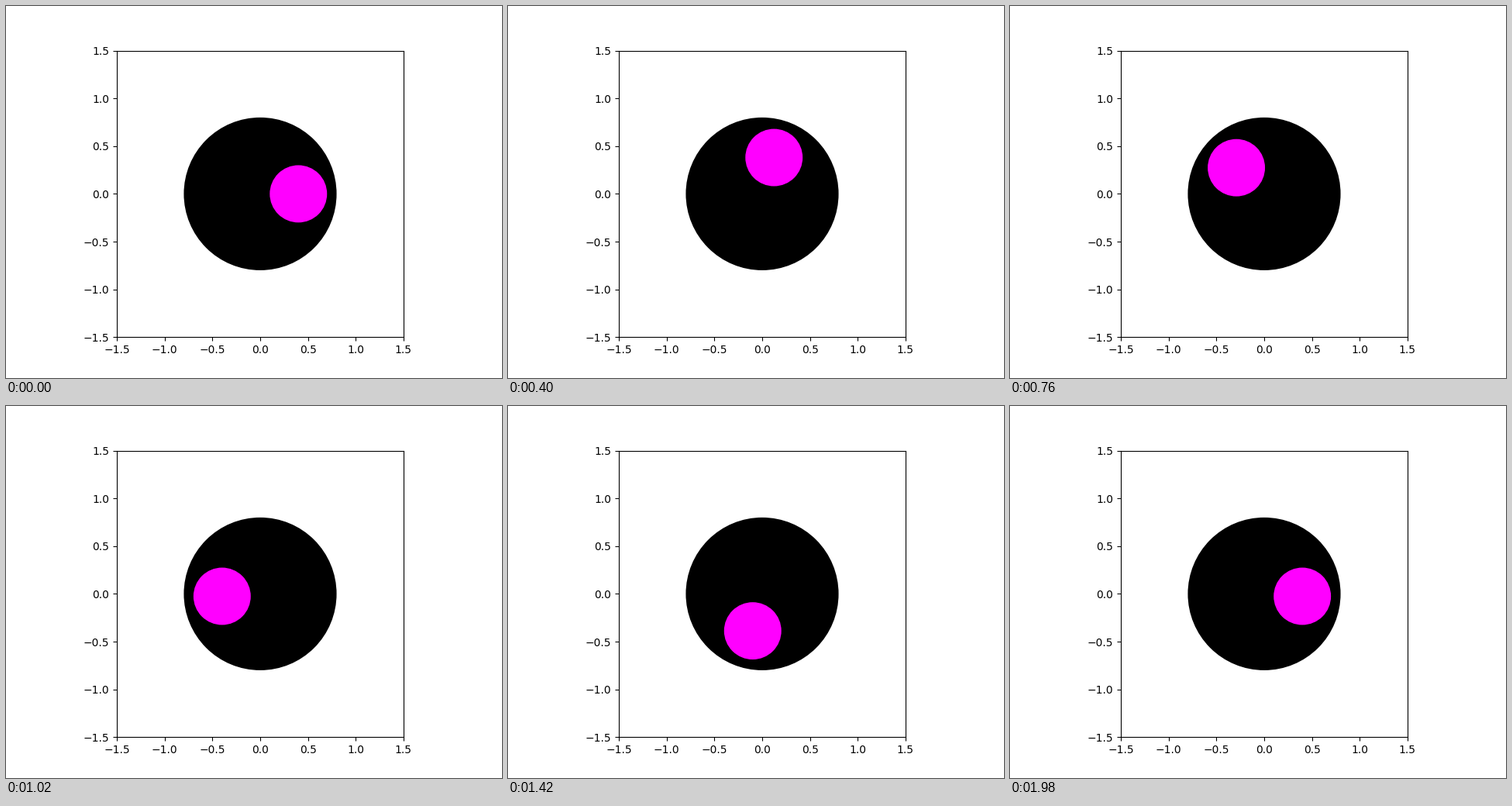
These frames come from a looping animation (640x480 px, 2 s). A matplotlib script:

```python
import numpy as np
import matplotlib.pyplot as plt
from matplotlib.animation import FuncAnimation

FRAMES = 100
INTERVAL = 20  # ms
ORBIT = 0.4

fig, ax = plt.subplots(figsize=(6.4, 4.8), dpi=100)
ax.set(xlim=(-1.5, 1.5), ylim=(-1.5, 1.5), aspect="equal")

disc = plt.Circle((0, 0), 0.8, fc="black")
dot = plt.Circle((ORBIT, 0), 0.3, fc="magenta")
ax.add_patch(disc)
ax.add_patch(dot)


def update(i):
    angle = 2 * np.pi * i / FRAMES
    dot.center = ORBIT * np.cos(angle), ORBIT * np.sin(angle)
    return (dot,)


anim = FuncAnimation(fig, update, frames=FRAMES, interval=INTERVAL,
                     repeat=True, repeat_delay=0)
plt.show()
```
